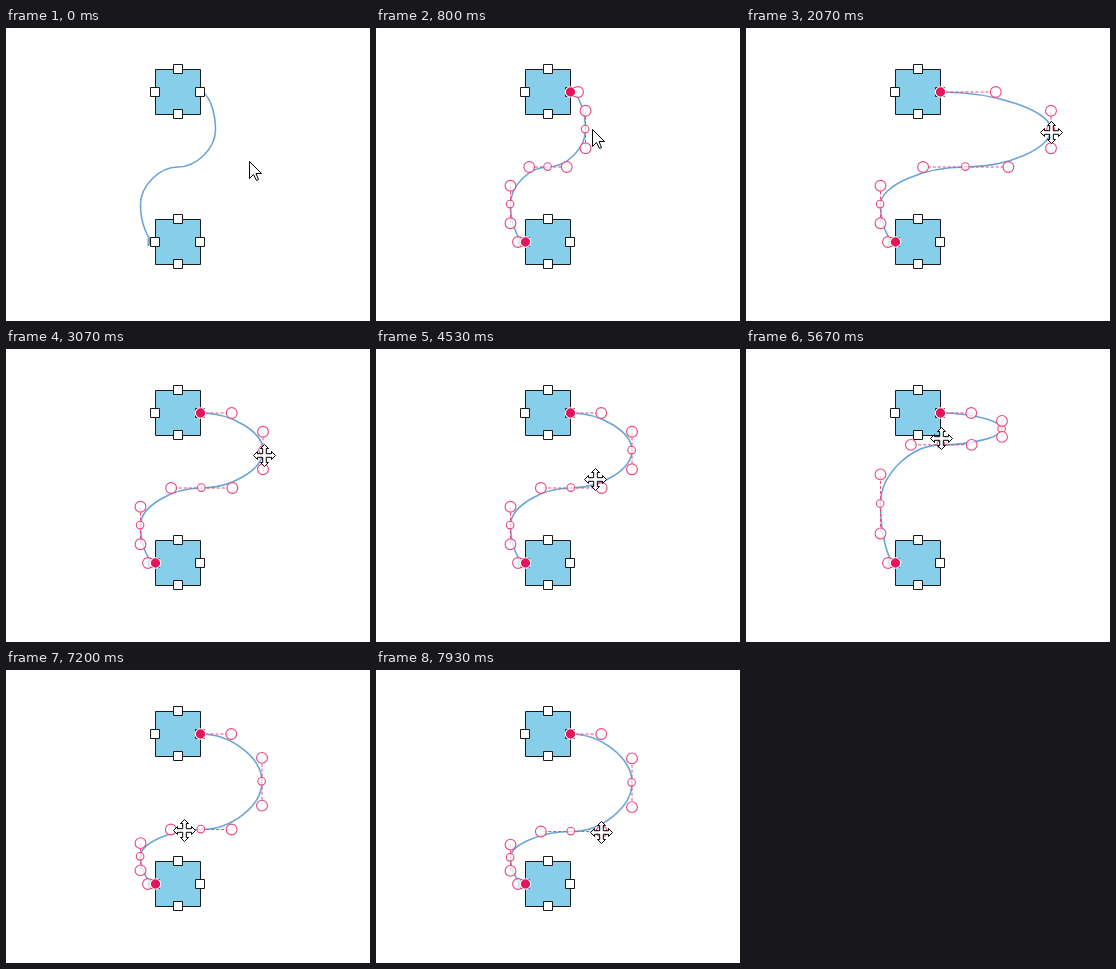
These frames come from a looping animation (364 px wide and 293 px high, 8 s). An HTML page with a canvas:

```html
<!DOCTYPE html>
<html lang="en">
<head>
<meta charset="utf-8">
<title>Connector editing</title>
<style>
html, body { margin: 0; width: 100%; height: 100%; overflow: hidden; background: #fff; }
canvas { display: block; }
</style>
</head>
<body>
<canvas id="stage" width="364" height="293"></canvas>
<script>
const ctx = document.getElementById('stage').getContext('2d');
const LOOP = 8000, FPS = 15;
const BLUE = '#6ba5d7', PINK = '#e8487f', RED = '#e3165b';
const START = { x: 194.5, y: 64 }, END = { x: 149.5, y: 214 }, LEFT = 134.5;
const SELECT_AT = 10, MOVE_CURSOR_AT = 16;

// A value that eases out from target to target.
class Track {
  constructor(start) {
    this.start = start;
    this.moves = [];
  }
  to(at, length, target, power) {
    this.moves.push({ at, length, target, power });
  }
  value(tick) {
    return this.moves.reduce((value, { at, length, target, power }) => {
      const p = Math.min(1, Math.max(0, (tick - at) / length));
      return value + (target - value) * (1 - (1 - p) ** power);
    }, this.start);
  }
}

const mouseX = new Track(243.5), mouseY = new Track(133);
const right = new Track(209.5), middle = new Track(139);

function hover(at, length, x, y, power = 1.5) {
  mouseX.to(at, length, x, y === undefined ? 1 : power);
  mouseY.to(at, length, y, power);
}

// A dragged segment trails the mouse a little.
function dragRight(at, length, x, y) {
  hover(at, length, x, y, 1.7);
  right.to(at, length, x - 0.5, 1.5);
}

function dragMiddle(at, length, x, y) {
  hover(at, length, x, y, 2.4);
  middle.to(at, length, y - 1, 1.8);
}

hover(0, 4, 204, 96);
hover(9, 4, 218, 102);
hover(13, 5, 209, 104);
dragRight(23, 1, 208.5, 104.5);
dragRight(24, 7, 305.5, 104.5);
dragRight(39, 4, 257.5, 107);
hover(45, 6, 260, 104);
dragRight(55, 4, 252, 62);
dragRight(59, 5, 256.5, 96);
hover(66, 2, 219.5, 130.5);
hover(68, 7, 196, 140);
dragMiddle(82, 7, 195.5, 72);
dragMiddle(91, 7, 199, 160.5);
hover(106, 4, 168, 160.5);
hover(111, 3, 192, 160.5);
dragMiddle(116, 3, 225.5, 162.5);

function paint(fill, stroke, width = 1) {
  ctx.fillStyle = fill;
  ctx.fill();
  if (!stroke) return;
  ctx.strokeStyle = stroke;
  ctx.lineWidth = width;
  ctx.stroke();
}

function polygon(points, fill, stroke) {
  ctx.beginPath();
  points.forEach(([x, y]) => ctx.lineTo(x, y));
  ctx.closePath();
  paint(fill, stroke);
}

function circle(x, y, r, fill, stroke) {
  ctx.beginPath();
  ctx.arc(x, y, r, 0, Math.PI * 2);
  paint(fill, stroke, 1.1);
}

function box(x, y, size, fill) {
  ctx.beginPath();
  ctx.rect(x, y, size, size);
  paint(fill, '#1a1a1a');
}

function node(y) {
  box(149.5, y - 22.5, 45, '#87ceeb');
}

function ports(y) {
  for (let i = 0; i < 4; i++) {
    const angle = i * Math.PI / 2;
    const x = 172 + 22.5 * Math.round(Math.cos(angle));
    const top = y + 22.5 * Math.round(Math.sin(angle));
    box(Math.floor(x - 5) + 0.5, Math.floor(top - 5) + 0.5, 9, '#fff');
  }
}

// Joints sit at segment midpoints, controls halfway from joint to corner.
function connector(rightX, middleY) {
  const mid = (a, b) => [(a[0] + b[0]) / 2, (a[1] + b[1]) / 2];
  const corners = [[rightX, START.y], [rightX, middleY], [LEFT, middleY], [LEFT, END.y]];
  const joints = [[START.x, START.y]];
  for (let i = 0; i < 3; i++) joints.push(mid(corners[i], corners[i + 1]));
  joints.push([END.x, END.y]);
  return corners.map((c, i) => ({
    from: joints[i], c1: mid(joints[i], c), c2: mid(c, joints[i + 1]), to: joints[i + 1]
  }));
}

function drawConnector(parts) {
  ctx.beginPath();
  ctx.moveTo(...parts[0].from);
  for (const p of parts) ctx.bezierCurveTo(...p.c1, ...p.c2, ...p.to);
  ctx.strokeStyle = BLUE;
  ctx.lineWidth = 1.6;
  ctx.stroke();
  polygon([[141.5, 209.5], [END.x, END.y], [141.5, 218.5]], BLUE);
}

function drawHandles(parts) {
  const glass = 'rgba(255, 255, 255, 0.75)';
  ctx.beginPath();
  for (const p of parts) {
    ctx.moveTo(...p.from);
    ctx.lineTo(...p.c1);
    ctx.moveTo(...p.to);
    ctx.lineTo(...p.c2);
  }
  ctx.setLineDash([3, 2]);
  ctx.strokeStyle = PINK;
  ctx.lineWidth = 1;
  ctx.stroke();
  ctx.setLineDash([]);
  for (const p of parts.slice(1)) circle(p.from[0] - 0.4, p.from[1] - 0.4, 3.8, glass, PINK);
  for (const p of parts) {
    circle(...p.c1, 5.4, glass, PINK);
    circle(...p.c2, 5.4, glass, PINK);
  }
  for (const { x, y } of [START, END]) circle(x, y, 5.2, RED, '#fff');
}

const arrow = [[0, 0], [0, 17], [4, 13], [7, 19], [9, 18], [6.5, 12], [12, 12]];
const arm = [[0, -11], [4, -7], [1.8, -7], [1.8, -1.8], [7, -1.8], [7, -4]];
const turn = points => points.map(([x, y]) => [-y, x]);
const half = [...arm, ...turn(arm)];
const fourWay = [...half, ...turn(turn(half))];

function drawCursor(tick) {
  ctx.save();
  ctx.translate(Math.floor(mouseX.value(tick)) + 0.5, Math.floor(mouseY.value(tick)) + 0.5);
  polygon(tick < MOVE_CURSOR_AT ? arrow : fourWay, '#fff', '#000');
  ctx.restore();
}

function draw(now) {
  const tick = Math.floor((now % LOOP) / 1000 * FPS + 0.1);
  const parts = connector(right.value(tick), middle.value(tick));
  ctx.fillStyle = '#fff';
  ctx.fillRect(0, 0, 364, 293);
  node(START.y);
  node(END.y);
  drawConnector(parts);
  ports(START.y);
  ports(END.y);
  if (tick >= SELECT_AT) drawHandles(parts);
  drawCursor(tick);
}

let began;
function loop(now) {
  began ??= now;
  draw(now - began);
  requestAnimationFrame(loop);
}
draw(0);
requestAnimationFrame(loop);
</script>
</body>
</html>
```
